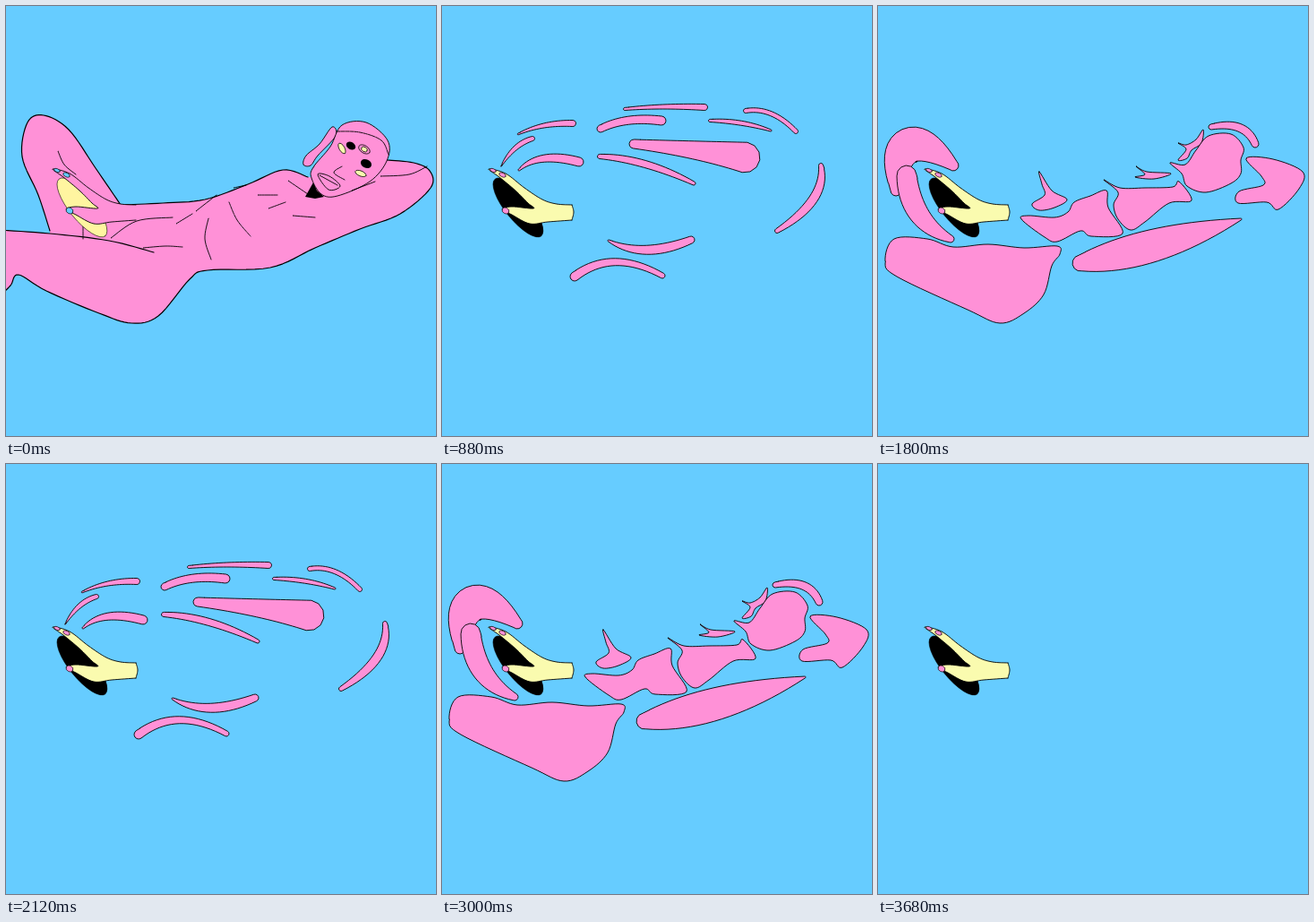
An HTML page with a canvas that plays this animation: 480 px wide and 480 px high, repeating every 3.72 s.

```html
<!DOCTYPE html>
<html lang="en">
<head>
<meta charset="utf-8">
<title>Drift</title>
<style>
html, body { margin: 0; width: 100%; height: 100%; overflow: hidden; background: #66ccff; }
canvas { display: block; width: 100vw; height: 100vh; }
</style>
</head>
<body>
<canvas id="stage" width="480" height="480"></canvas>
<script>
const ctx = document.getElementById('stage').getContext('2d');
const BLUE = '#66ccff', PINK = '#ff91d7', YELLOW = '#fafbaf', INK = '#000';
const CYCLE = 1240, STEP = 40, COUNT = 80;
const CRACK = 440, SPLIT = 520, MELT = 560, SWIRL = 880, GONE = 1200;
const TIP = [60, 184], HUB = [240, 200], TURN = [150, 118];

const parse = s => s.split(' ').map(p => p.split(',').map(Number));
const lerp = (a, b, t) => a + (b - a) * t;
const clamp = t => Math.max(0, Math.min(1, t));
const xy = f => [f(0), f(1)];

// Catmull-Rom curve through key points
function spline(pts, closed) {
  const n = pts.length, out = [];
  const at = i => closed ? pts[(i + n) % n] : pts[Math.max(0, Math.min(n - 1, i))];
  for (let i = 0; i < (closed ? n : n - 1); i++) {
    const [a, b, c, d] = [at(i - 1), at(i), at(i + 1), at(i + 2)];
    for (let t = 0; t < 1; t += 1 / 8)
      out.push(xy(j => b[j] + t / 2 * (c[j] - a[j] +
        t * (2 * a[j] - 5 * b[j] + 4 * c[j] - d[j] + t * (3 * (b[j] - c[j]) + d[j] - a[j])))));
  }
  if (!closed) out.push(pts[n - 1]);
  return out;
}

const loop = s => spline(parse(s), true);
const line = s => spline(parse(s), false);

// Round-ended band along a quadratic curve, with start, middle and end radius
function ribbon(path, r0, rm, r1) {
  const [a, b, c] = parse(path), left = [], right = [];
  const edge = (t, turn) => {
    const p = xy(j => (1 - t) ** 2 * a[j] + 2 * t * (1 - t) * b[j] + t * t * c[j]);
    const d = xy(j => (1 - t) * (b[j] - a[j]) + t * (c[j] - b[j]));
    const r = (1 - 2 * t) * (1 - t) * r0 + 4 * t * (1 - t) * rm + t * (2 * t - 1) * r1;
    const dir = Math.atan2(d[1], d[0]) + turn;
    return [p[0] + r * Math.cos(dir), p[1] + r * Math.sin(dir)];
  };
  const cap = (t, from) => Array.from({ length: 7 }, (_, i) => edge(t, from + i * Math.PI / 6));
  for (let t = 0.05; t < 0.99; t += 0.05) {
    left.push(edge(t, -Math.PI / 2));
    right.unshift(edge(t, Math.PI / 2));
  }
  return [...left, ...cap(1, -Math.PI / 2), ...right, ...cap(0, Math.PI / 2)];
}

// Equal spacing along a closed curve
function resample(pts) {
  const ring = [...pts, pts[0]], len = [0];
  for (let i = 1; i < ring.length; i++)
    len.push(len[i - 1] + Math.hypot(ring[i][0] - ring[i - 1][0], ring[i][1] - ring[i - 1][1]));
  const total = len[len.length - 1], out = [];
  for (let k = 0, i = 0; k < COUNT; k++) {
    const want = total * k / COUNT;
    while (len[i + 1] <= want) i++;
    const t = (want - len[i]) / (len[i + 1] - len[i]);
    out.push(xy(j => lerp(ring[i][j], ring[i + 1][j], t)));
  }
  return out;
}

const center = pts => xy(j => pts.reduce((s, p) => s + p[j], 0) / pts.length);

// Rotate the point order of b so it pairs best with a
function align(a, b) {
  const ca = center(a), cb = center(b);
  const cost = s => a.reduce((sum, p, i) => {
    const q = b[(i + s) % COUNT];
    return sum + Math.hypot(p[0] - ca[0] - q[0] + cb[0], p[1] - ca[1] - q[1] + cb[1]) ** 2;
  }, 0);
  let best = 0;
  for (let s = 1; s < COUNT; s++) if (cost(s) < cost(best)) best = s;
  return a.map((_, i) => b[(i + best) % COUNT]);
}

const pieces = [];
function piece(shard, streak) {
  const from = resample(shard);
  pieces.push({ shard, streak, from, to: align(from, resample(streak)) });
}

// Raised knee, shin, thigh, wrist
piece(ribbon('20,206 18,120 84,178', 6, 20, 6), ribbon('66,179 80,154 101,148', 0.3, 2.5, 2.5));
piece(ribbon('32,189 36,241 81,260', 11, 11, 4), ribbon('186,262 225,283 278,261', 1, 5, 4));
piece(loop('8,285 18,260 55,260 84,269 123,266 163,270 200,268 203,277 194,290 185,322 163,343 136,354 100,339 21,302'),
  ribbon('148,302 190,270 246,301', 5, 4, 3));
piece(loop('180,185 194,206 211,216 197,225 180,228 172,221 186,211 183,199'),
  ribbon('86,183 108,162 153,174', 1, 4, 5));
// Belly, chest, side, collar
piece(loop('160,238 168,234 197,236 212,230 219,219 237,212 255,206 257,225 273,254 238,257 226,251 200,263 186,258'),
  ribbon('176,168 225,170 281,198', 2.5, 4, 2));
piece(loop('252,194 270,203 298,203 329,202 336,196 350,217 325,220 298,241 282,250 268,238 263,222 268,208'),
  ribbon('214,154 285,160 338,169', 5, 10, 17));
piece(ribbon('226,287 300,272 405,238', 9, 18, 1), ribbon('423,178 430,217 374,251', 2.5, 5, 2.5));
piece(loop('288,179 300,185 327,187 308,193 287,191 298,188'), ribbon('85,143 112,130 146,131', 0.8, 2.5, 3.5));
// Ear, face, crown, arm
piece(loop('335,153 344,155 355,149 363,138 361,153 350,161 345,170 335,172 344,160'),
  ribbon('299,128 335,128 367,139', 1.5, 2.5, 1));
piece(loop('326,175 343,177 355,161 369,145 394,143 408,158 405,172 405,187 394,198 366,208 345,201 339,187'),
  ribbon('177,137 205,123 245,128', 4, 4.5, 5));
piece(ribbon('372,135 410,127 421,154', 3, 4.5, 4), ribbon('204,115 245,111 293,113', 1.5, 2.5, 3.5));
piece(loop('411,170 441,171 474,185 470,204 447,227 434,219 402,220 403,207 430,200 428,190'),
  ribbon('339,117 368,112 395,140', 2.5, 2.5, 2.5));

// Figure at rest
const leg = line('49,251 36,211 18,168 24,130 42,122 70,138 100,181 128,222');
const back = line('128,222 175,220 222,216 270,199 309,183 337,191');
const under = line('425,172 455,175 473,184 474,203 440,232 395,249 345,270 295,292 225,295 205,305 170,346 140,354 104,343 45,318 14,300 5,312 -8,325');
const seat = line('-8,250 49,254 115,262 165,275');
const head = loop('343,180 341,192 352,210 370,212 406,196 425,173 426,150 402,130 375,133 362,157');
const ear = loop('332,177 335,167 350,154 364,135 368,145 348,167 340,178');
const neck = parse('343,197 334,213 345,215 355,213 347,206');
const creases = [
  '58,162 65,177 78,188', '86,243 86,260', '117,259 146,240 186,236', '153,270 178,268 197,269',
  '190,243 208,232', '212,229 235,211', '226,237 222,260 229,283', '254,203 268,200', '281,211 303,211',
  '293,226 312,219', '320,234 345,236', '315,195 337,210', '386,206 412,196', '418,190 450,188 470,179',
  '375,179 366,186 378,194', '350,189 370,200'
].map(line);
const mouth = loop('348,188 361,190 373,201 360,205');
const scar = line('249,219 258,239 273,257');
const hair = line('369,140 395,141 419,150 427,166');

const hand = line('145,222 128,221 112,216 92,203 71,187 52,182 64,191 82,206 96,220 102,226 78,224 67,227 78,233 98,243 118,241 145,239');
const wrist = line('145,222 147,230 145,239');

function trace(pts, closed) {
  ctx.beginPath();
  pts.forEach(p => ctx.lineTo(...p));
  if (closed) ctx.closePath();
}

function fill(pts, color) {
  trace(pts, true);
  ctx.fillStyle = color;
  ctx.fill();
}

function stroke(pts, width = 0.9, color = INK, closed = false) {
  trace(pts, closed);
  ctx.lineWidth = width;
  ctx.strokeStyle = color;
  ctx.stroke();
}

function shape(pts) {
  fill(pts, PINK);
  stroke(pts, 0.9, INK, true);
}

function bean(x, y, rx, ry, deg, color, edge = 0) {
  ctx.beginPath();
  ctx.ellipse(x, y, rx, ry, deg * Math.PI / 180, 0, 7);
  ctx.fillStyle = color;
  ctx.fill();
  if (!edge) return;
  ctx.lineWidth = edge;
  ctx.strokeStyle = INK;
  ctx.stroke();
}

function drawHand(skin, nail, held, loose) {
  bean(85, 225, 41, 14, 51, held, 0.6);
  fill([...hand, ...wrist.slice().reverse()], skin);
  stroke(hand);
  if (loose) stroke(wrist);
  bean(57, 183.5, 3.6, 1.8, 22, nail, 0.7);
  bean(67.5, 188.5, 4, 2.2, 25, nail, 0.7);
  bean(71, 228.5, 4, 3.2, 25, nail, 0.7);
}

function drawBody() {
  fill([...leg, ...back, [400, 195], ...under, ...seat.slice(0, 9)], PINK);
  [leg, back, under, seat].forEach(l => stroke(l, 1.2));
  fill(neck, INK);
  shape(ear);
  shape(head);
  creases.forEach(c => stroke(c));
  stroke(mouth, 0.9, INK, true);
  ctx.setLineDash([4, 1]);
  stroke(scar);
  stroke(hair);
  ctx.setLineDash([]);
  bean(385, 156, 5.6, 4, 32, INK);
  bean(402, 176, 6.3, 4.7, 25, INK);
  bean(375, 159, 6.5, 3, 60, YELLOW, 0.8);
  bean(396, 187, 6.5, 2.9, 22, YELLOW, 0.8);
  bean(400, 160, 7, 4.2, 32, PINK, 0.8);
  bean(400, 160, 3.6, 2.6, 32, YELLOW, 0.8);
  drawHand(PINK, BLUE, '#fff5a0', false);
}

// Gaps open between the parts as the swelling shrinks
function drawCracks(swell) {
  if (!swell) return pieces.forEach(p => shape(p.shard));
  pieces.forEach(p => stroke(p.shard, swell + 2, INK, true));
  pieces.forEach(p => {
    fill(p.shard, PINK);
    stroke(p.shard, swell, PINK, true);
  });
}

// Counter-clockwise sweep of one point into the fingertips
function drain(p, t) {
  const u = clamp(t * 1.5 - Math.hypot(p[0] - TIP[0], p[1] - TIP[1]) / 760);
  const e = u ** 1.4, v = 1 - e;
  const c = [p[0] + (p[1] - HUB[1]) * 0.4, p[1] - (p[0] - HUB[0]) * 0.3];
  return xy(j => v ** 3 * p[j] + 3 * v * v * e * c[j] + 3 * v * e * e * TURN[j] + e ** 3 * TIP[j]);
}

function drawFlow(ms) {
  const melt = ((ms - MELT) / (SWIRL - MELT)) ** 1.3;
  const swirl = (ms - SWIRL) / (GONE - SWIRL);
  pieces.forEach(p => shape(swirl < 0
    ? p.from.map((a, i) => xy(j => lerp(a[j], p.to[i][j], melt)))
    : p.streak.map(q => drain(q, swirl))));
}

function render(ms) {
  ctx.fillStyle = BLUE;
  ctx.fillRect(0, 0, 480, 480);
  if (ms < CRACK) return drawBody();
  if (ms <= MELT) drawCracks(14 * clamp((SPLIT - ms) / (SPLIT - CRACK)));
  else if (ms < GONE) drawFlow(ms);
  drawHand(YELLOW, PINK, INK, true);
}

ctx.lineJoin = ctx.lineCap = 'round';
const start = performance.now();
function tick() {
  const ms = (performance.now() - start) % CYCLE;
  render(Math.floor(ms / STEP) * STEP);
  requestAnimationFrame(tick);
}
tick();
</script>
</body>
</html>
```
